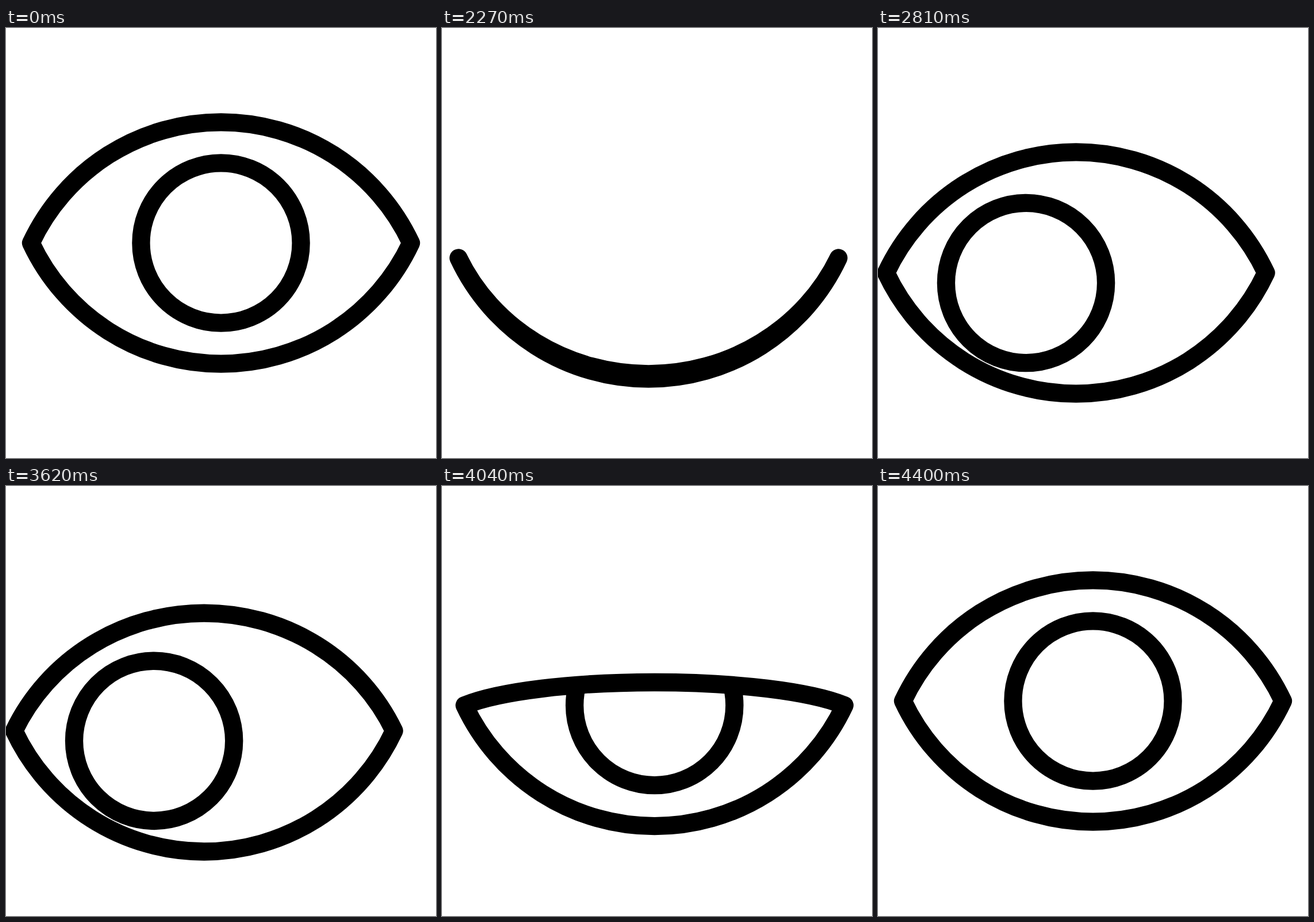
These frames come from a looping animation (748 px wide and 748 px high, 4.43 s). An HTML page:

```html
<!DOCTYPE html>
<html lang="en">
<head>
<meta charset="utf-8">
<title>Blinking eye</title>
<style>
  html, body { margin: 0; width: 100%; height: 100%; overflow: hidden; background: #fff; }
  svg { display: block; width: 100%; height: 100%; }
</style>
</head>
<body>
<svg viewBox="0 0 748 748" fill="none" stroke="#000" stroke-width="31.4" stroke-linejoin="round">
  <clipPath id="opening"><path id="gap"/></clipPath>
  <g id="eye">
    <g clip-path="url(#opening)"><circle id="iris" r="139.1"/></g>
    <path id="lids"/>
  </g>
</svg>
<script>
const LOOP = 4430, STEP = 30;
const LOOK_AWAY = 2030, LOOK_BACK = 3620;
const MOVE = 810, BLINK = 281.4;        // glide time, and time to close or reopen the lid
const HALF = 330.5, RADIUS = 365;       // half width and curvature of the lids
const CLOSED = -0.972;                  // upper lid scale when shut; 1 is wide open

const [eye, iris, lids, gap] = ['eye', 'iris', 'lids', 'gap'].map(id => document.getElementById(id));
const clamp = x => Math.min(1, Math.max(0, x));
const smooth = x => x * x * (3 - 2 * x);

// cubic-bezier(.4, 0, .155, 1)
function glide(x) {
  let lo = 0, hi = 1;
  for (let i = 0; i < 30; i++) {
    const s = (lo + hi) / 2, r = 1 - s;
    if (1.2 * s * r * r + 0.465 * s * s * r + s ** 3 < x) lo = s; else hi = s;
  }
  return smooth(hi);
}

function draw(now) {
  const t = now % LOOP;
  const back = t >= LOOK_BACK;
  const elapsed = t - (back ? LOOK_BACK : LOOK_AWAY);
  const u = elapsed < 0 ? 0 : (Math.floor(elapsed / STEP) + 1) * STEP;
  const blinkTime = Math.max(0, u - (back ? 11 : 1));

  const moved = glide(clamp(u / MOVE));
  const shift = back ? 1 - moved : moved;
  const shut = smooth(clamp(1 - Math.abs(blinkTime / BLINK - 1)));
  const open = 1 + (CLOSED - 1) * shut;
  const aside = (blinkTime >= BLINK) !== back;   // the iris jumps while hidden

  const d = `M${-HALF} 0A${RADIUS} ${RADIUS * Math.abs(open)} 0 0 ${open > 0 ? 1 : 0} ${HALF} 0` +
            `A${RADIUS} ${RADIUS} 0 0 1 ${-HALF} 0Z`;
  lids.setAttribute('d', d);
  gap.setAttribute('d', d);
  iris.setAttribute('transform', aside ? 'translate(-87 17.5)' : '');
  eye.setAttribute('transform', `translate(${374 - 29.5 * shift} ${374 + 52 * shift})`);
}

const start = performance.now();
(function tick() {
  draw(performance.now() - start);
  requestAnimationFrame(tick);
})();
</script>
</body>
</html>
```
